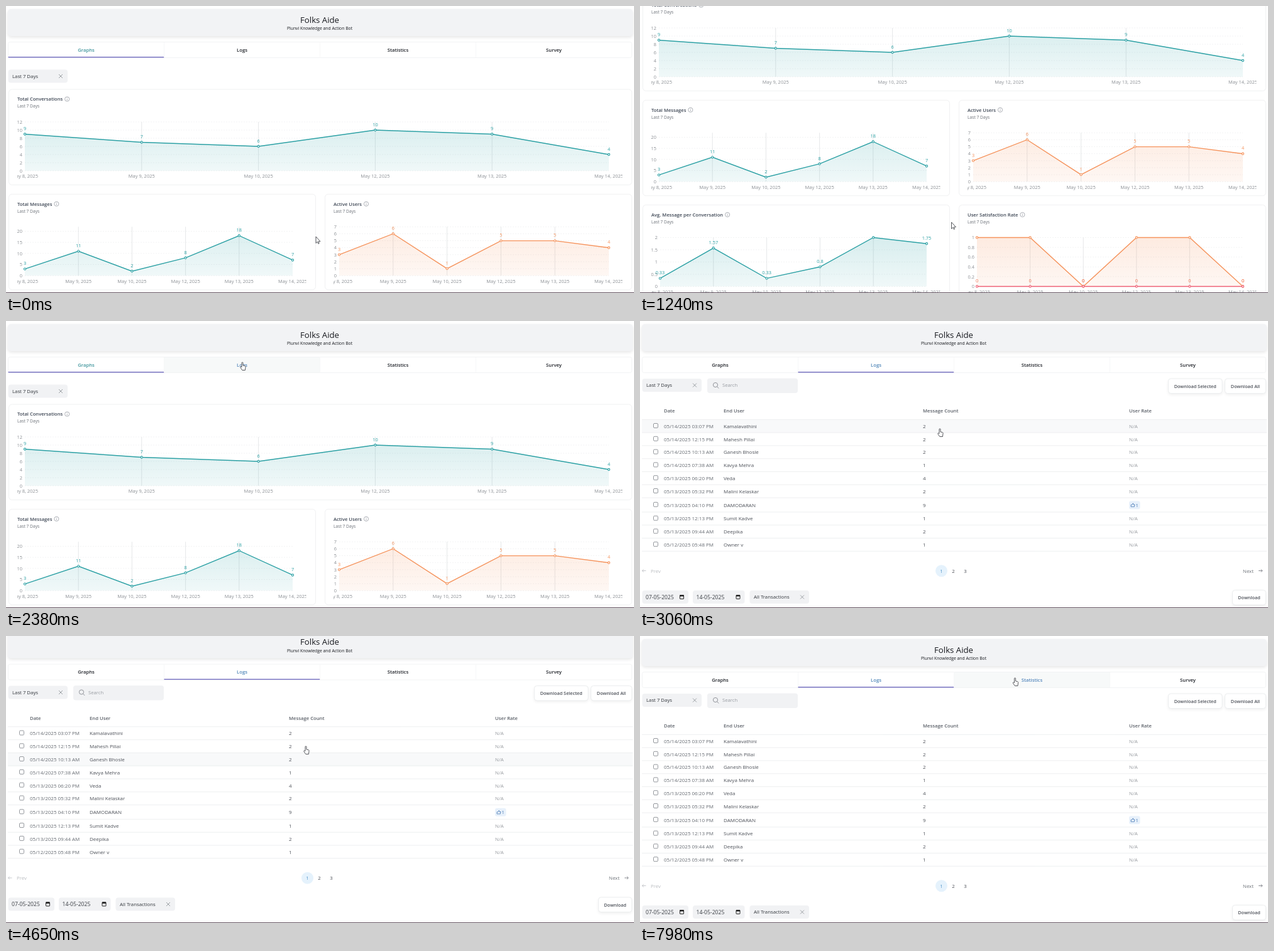
Animation of 999 by 458 pixels, one loop 8 s. Source, as an HTML page with a canvas:

```html
<!DOCTYPE html>
<html lang="en">
<head>
<meta charset="utf-8">
<title>Bot dashboard</title>
<style>
html, body { margin: 0; width: 100%; height: 100%; overflow: hidden; background: #fff; }
canvas { display: block; }
</style>
</head>
<body>
<canvas id="stage" width="999" height="458"></canvas>
<script>
const c = document.getElementById('stage').getContext('2d');
const W = 999, H = 458, LOOP = 8000;
const TEAL = '#2ba0a4', ORANGE = '#f5935c', RED = '#ee5f74', GREY = '#8b8f94', DARK = '#4c5058';
const TABS = ['Graphs', 'Logs', 'Statistics', 'Survey'];
const DATES = [8, 9, 10, 12, 13, 14];

// Tracks: [time, value, ...], eased between the entries
const scrollKeys = [[0, 0], [170, 0], [850, 177], [1130, 177], [1240, 150], [1340, 150], [1740, 47.5],
  [1810, 47.5], [1980, 0], [3290, 0], [3560, 12.5], [4800, 12.5], [4900, 0], [LOOP, 0]];
const cursorKeys = [[0, 493, 368], [170, 493, 368], [600, 495.5, 345], [1980, 495.5, 345], [2330, 375, 66],
  [2740, 375, 66], [3040, 476, 172], [3290, 476, 172], [3650, 476, 190], [4480, 476, 190],
  [4640, 476, 176], [7330, 476, 176], [7700, 595.5, 67], [LOOP, 595.5, 67]];
const panelKeys = [[0, 1010], [4980, 1010], [5330, 655], [7760, 655], [7960, 1010], [LOOP, 1010]];

function at(keys, t) {
  const i = Math.max(1, keys.findIndex(k => k[0] > t));
  const a = keys[i - 1], b = keys[i];
  const u = (t - a[0]) / (b[0] - a[0]), e = u * u * (3 - 2 * u);
  return a.slice(1).map((v, j) => v + (b[j + 1] - v) * e);
}

function text(s, x, y, size = 7.8, color = DARK, align = 'left', weight = 400) {
  c.font = `${weight} ${size}px "Open Sans", "Noto Sans", sans-serif`;
  c.textAlign = align;
  c.fillStyle = color;
  c.fillText(s, x, y + size * 0.36);
  return c.measureText(s).width;
}

function box(x, y, w, h, r, fill, border, shadow) {
  c.save();
  c.beginPath();
  c.roundRect(x, y, w, h, r);
  if (shadow) { c.shadowColor = shadow; c.shadowBlur = 5; c.shadowOffsetY = 2; }
  if (fill) { c.fillStyle = fill; c.fill(); }
  c.shadowColor = 'transparent';
  if (border) { c.strokeStyle = border; c.lineWidth = 1; c.stroke(); }
  c.restore();
}

function path(points, color, width = 1) {
  c.beginPath();
  points.forEach(([x, y], i) => i ? c.lineTo(x, y) : c.moveTo(x, y));
  c.strokeStyle = color;
  c.lineWidth = width;
  c.stroke();
}

function dot(x, y, r, fill, border, width = 1) {
  c.beginPath();
  c.arc(x, y, r, 0, 7);
  if (fill) { c.fillStyle = fill; c.fill(); }
  if (border) { c.strokeStyle = border; c.lineWidth = width; c.stroke(); }
}

function cross(x, y) {
  path([[x - 3, y - 3], [x + 3, y + 3]], '#85898e', 0.8);
  path([[x + 3, y - 3], [x - 3, y + 3]], '#85898e', 0.8);
}

function button(s, x, y, w) {
  box(x, y, w, 23.5, 4, '#fff', '#eceeef', 'rgba(0,0,0,.07)');
  text(s, x + w / 2, y + 12, 7.3, DARK, 'center', 600);
}

function select(s, x, y, w) {
  box(x, y, w, 21, 4, '#f1f2f4');
  text(s, x + 6.5, y + 10.5, 7.8, '#30343a');
  cross(x + w - 11, y + 10.5);
}

function header(active, hover) {
  box(3, 5, 994, 43, 5, '#f2f3f5', null, 'rgba(0,0,0,.1)');
  text('Folks Aide', 499, 22, 13.2, '#16181d', 'center');
  text('Plunvi Knowledge and Action Bot', 499, 36, 6.8, '#16181d', 'center');
  box(3.5, 57.5, 992, 25, 3, '#fff', '#f2f3f4');
  TABS.forEach((s, i) => {
    const x = 3.5 + 248 * i;
    if (i === hover) box(x, 58, 248, 24, 0, '#f7f9f9');
    if (i) path([[x, 58], [x, 82]], '#f6f7f8');
    const color = i === active ? (i ? '#4f86b8' : '#3f959c') : i === hover ? '#5688bd' : '#1f2228';
    text(s, x + 124, 70, 7.7, color, 'center', 600);
    if (i === active) box(x, 81, 248, 1.3, 0, '#625bb8');
  });
}

function area(points, base, color) {
  const fill = c.createLinearGradient(0, base - 78, 0, base);
  fill.addColorStop(0, color + '30');
  fill.addColorStop(1, color + '12');
  c.beginPath();
  c.moveTo(points[0][0], base);
  points.forEach(p => c.lineTo(...p));
  c.lineTo(points[5][0], base);
  c.fillStyle = fill;
  c.fill();
}

function series(values, xs, base, max, color, labelColor = color) {
  const pts = values.map((v, i) => [xs[i], base - v / max * 78]);
  area(pts, base, color);
  path(pts, color, 1.4);
  pts.forEach(([x, y], i) => {
    dot(x, y, 1.6, '#fff', color, 1.1);
    if (values[i] < max) text(values[i], x, y - 9, 7.4, labelColor, 'center');
  });
}

function chart({ title, x, y, w, x0, max, step, values, color, zeros }) {
  box(x + 0.5, y, w, 152.5, 5, '#fff', '#f0f1f2');
  const tw = text(title, x + 14, y + 15.5, 7.6, '#3d4654', 'left', 600);
  const ix = x + 14 + tw + 7, iy = y + 15.5;
  dot(ix, iy, 3.6, null, '#9a9ea5', 0.8);
  path([[ix, iy - 0.5], [ix, iy + 2]], '#9a9ea5', 0.8);
  path([[ix, iy - 2.2], [ix, iy - 1.3]], '#9a9ea5', 0.8);
  text('Last 7 Days', x + 14, y + 27, 6.7, '#6a6f76');

  const base = y + 130, right = x + w - 36;
  const xs = DATES.map((d, i) => x0 + (right - x0) * i / 5);
  c.save();
  c.beginPath();
  c.rect(x + 14, y + 30, w - 28.5, 122);
  c.clip();
  for (let i = 0; i <= Math.floor(max / step + 0.01); i++) {
    const gy = base - i * step / max * 78;
    c.setLineDash([2, 2]);
    path([[x0, gy], [right, gy]], '#f0f1f2', 0.8);
    c.setLineDash([]);
    text(+(i * step).toFixed(1), x0 - 4, gy, 7.4, GREY, 'right');
  }
  xs.slice(1, 5).forEach(vx => path([[vx, base - 78], [vx, base]], '#dfe1e3', 0.8));
  series(values, xs, base, max, color);
  if (zeros) series([0, 0, 0, 0, 0, 0], xs, base, max, RED, '#ee7050');
  xs.forEach((lx, i) => text(`May ${DATES[i]}, 2025`, lx, base + 8.5, 7.5, GREY, 'center'));
  c.restore();
}

const charts = [
  { title: 'Total Conversations', x: 4, y: 133, w: 991, x0: 30, max: 12, step: 2, values: [9, 7, 6, 10, 9, 4], color: TEAL },
  { title: 'Total Messages', x: 4, y: 300.3, w: 488, x0: 30, max: 22, step: 5, values: [3, 11, 2, 8, 18, 7], color: TEAL },
  { title: 'Active Users', x: 507, y: 300.3, w: 488, x0: 530, max: 7, step: 1, values: [3, 6, 1, 5, 5, 4], color: ORANGE },
  { title: 'Avg. Message per Conversation', x: 4, y: 467.5, w: 488, x0: 32, max: 2, step: 0.5,
    values: [0.33, 1.57, 0.33, 0.8, 2, 1.75], color: TEAL },
  { title: 'User Satisfaction Rate', x: 507, y: 467.5, w: 488, x0: 536, max: 1, step: 0.2,
    values: [1, 1, 0, 1, 1, 0], color: ORANGE, zeros: true }
];

function graphsPage(hover) {
  header(0, hover);
  select('Last 7 Days', 3.5, 101.5, 94.5);
  charts.forEach(chart);
}

const rows = [
  ['14/2025 03:07 PM', 'Kamalavathini', 2], ['14/2025 12:15 PM', 'Mahesh Pillai', 2],
  ['14/2025 10:13 AM', 'Ganesh Bhosle', 2], ['14/2025 07:38 AM', 'Kavya Mehra', 1],
  ['13/2025 06:20 PM', 'Veda', 4], ['13/2025 05:32 PM', 'Malini Kelaskar', 2],
  ['13/2025 04:10 PM', 'DAMODARAN', 9], ['13/2025 12:13 PM', 'Sumit Kadve', 1],
  ['13/2025 09:44 AM', 'Deepika', 2], ['12/2025 05:48 PM', 'Owner v', 1]
];
const rowTop = i => 157.3 + 20.8 * i + (i > 6 ? 2 : 0);

function thumb(x, y) {
  box(778, y - 6.5, 17.5, 13, 3, '#e8f1fb');
  path([[x - 3, y - 0.5], [x - 1.3, y - 0.5], [x + 0.3, y - 3], [x + 1, y - 0.8], [x + 3, y - 0.8],
    [x + 2.3, y + 2.6], [x - 3, y + 2.6], [x - 3, y - 0.5]], '#4a7ab5', 0.8);
  text('1', 788.5, y, 7.6, '#4a7ab5');
}

function arrow(x, y, dir, color) {
  path([[x - 3 * dir, y], [x + 3 * dir, y]], color, 0.9);
  path([[x + 0.8 * dir, y - 2.3], [x + 3 * dir, y], [x + 0.8 * dir, y + 2.3]], color, 0.9);
}

function dateInput(s, x, w) {
  box(x, 430, w, 21, 4, '#f1f2f4');
  text(s, x + 5.5, 440.5, 8.6, '#3a3e44');
  const ix = x + w - 13.5;
  box(ix, 437.5, 6, 6, 0.5, null, '#222');
  box(ix, 437, 6, 2.5, 0, '#222');
}

function logsPage(hoverTab, hoverRow) {
  header(1, hoverTab);
  select('Last 7 Days', 3.5, 92, 94.5);
  box(107, 91.5, 144, 23.5, 4, '#f1f2f4');
  dot(120, 102, 3.6, null, '#868a90', 0.9);
  path([[122.6, 104.7], [125.3, 107.5]], '#868a90', 0.9);
  text('Search', 131, 102.5, 7.7, '#989ca2');
  button('Download Selected', 840.5, 92, 85.5);
  button('Download All', 930.5, 92, 65);

  [['Date', 38], ['End User', 133], ['Message Count', 450], ['User Rate', 778]]
    .forEach(([s, x]) => text(s, x, 143.5, 7.7, '#5b6068', 'left', 600));
  rows.forEach(([date, user, count], i) => {
    const top = rowTop(i), y = top + (i === 6 ? 11.7 : 10.7);
    if (i === hoverRow) box(3, top, 994, 20.8, 0, '#f8f9fa');
    path([[3, top], [997, top]], '#e9ebed', 0.8);
    box(21.5, y - 4.5, 7, 7, 1.5, '#fff', '#94989d');
    text('05/' + date, 38, y, 8, '#666b72');
    text(user, 133, y, 8);
    text(count, 450, y, 8);
    if (i === 6) thumb(784, y);
    else text('N/A', 778, y, 7.8, '#969a9f');
  });
  path([[3, rowTop(10)], [997, rowTop(10)]], '#e9ebed', 0.8);

  arrow(6.5, 398.5, -1, '#c2c5c9');
  text('Prev', 17, 399, 7.8, '#b9bcc0');
  dot(479.5, 398.8, 9.5, '#e5f2fc');
  ['1', '2', '3'].forEach((s, i) => text(s, 479.5 + 19 * i, 399, 7.8, i ? DARK : '#4a8fc6', 'center'));
  text('Next', 959, 399, 7.8, '#6d7278');
  arrow(987, 398.5, 1, '#7d8187');

  dateInput('07-05-2025', 3.5, 73.5);
  dateInput('14-05-2025', 84, 82.5);
  select('All Transactions', 174.5, 430, 94.5);
  button('Download', 942.5, 429.5, 53);
}

function bubble(s, x, y, w, user) {
  const fill = user ? '#cfe6fd' : '#ebecf1';
  box(x, y, w, 26.5, 9, fill);
  if (!user) {
    c.beginPath();
    c.moveTo(x - 4, y + 1);
    c.lineTo(x + 9, y);
    c.lineTo(x, y + 11);
    c.fillStyle = fill;
    c.fill();
  }
  text(s, x + 9, y + 13.3, 7.85, '#2c3038');
}

function chatPanel(x) {
  if (x > W) return;
  c.save();
  c.shadowColor = 'rgba(0,0,0,.14)';
  c.shadowBlur = 4;
  c.fillStyle = '#fff';
  c.fillRect(x, -10, 400, H + 20);
  c.restore();
  bubble('apply regularization for 02 may 2025', x + 202, 4.7, 152, true);
  bubble('Transactions Initiated for regularization', x + 24, 49.5, 161);
  bubble('Transactions Finalized for regularization', x + 191, 80.7, 163, true);
  bubble('Applied Regularization successfully.', x + 24, 125.3, 148);
}

const ARROW = 'M0 0V10.5L2.3 8.3L3.8 11.5L5.2 10.8L3.8 7.8H7Z';
const HAND = 'M0 .8C0 -.5 2 -.5 2 .8V5L5 5.6C6 6 6.2 6.8 6 7.8L5.4 12.5H.8L-2 8.4C-2.8 7.2 -1.5 6.2 0 7.7Z';
function cursor(x, y, hand) {
  c.save();
  c.translate(x, y);
  const p = new Path2D(hand ? HAND : ARROW);
  c.fillStyle = '#fff';
  c.fill(p);
  c.strokeStyle = '#44474c';
  c.lineWidth = 0.9;
  c.stroke(p);
  c.restore();
}

function draw(t) {
  const [scroll] = at(scrollKeys, t), [x, y] = at(cursorKeys, t), [panelX] = at(panelKeys, t);
  const logs = t >= 2450;
  const overTab = scroll < 1 && y > 57 && y < 83 ? Math.floor((x - 3.5) / 248) : -1;
  const overRow = t < 2980 || t > 7450 ? -1 : t > 3620 && t < 4800 ? 2 : 0;
  c.fillStyle = '#fff';
  c.fillRect(0, 0, W, H);
  c.save();
  c.translate(0, -scroll);
  if (logs) logsPage(overTab, overRow);
  else graphsPage(overTab);
  c.restore();
  chatPanel(panelX);
  cursor(x, y, logs || overTab >= 0);
  c.fillStyle = '#62525f';
  c.fillRect(0, 457, W, 1);
}

const start = performance.now();
function tick() {
  draw((performance.now() - start) % LOOP);
  requestAnimationFrame(tick);
}
tick();
</script>
</body>
</html>
```
